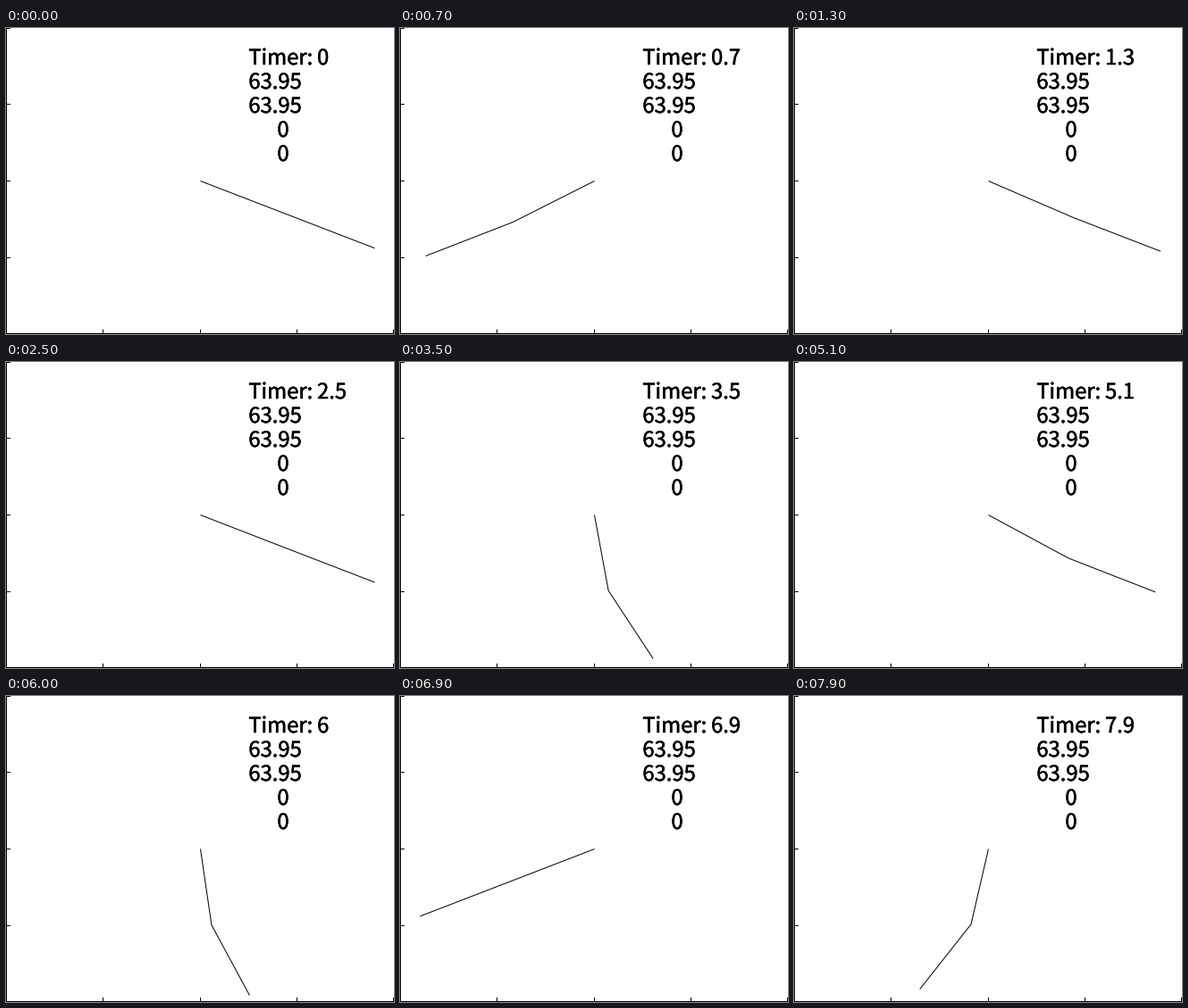
Animation, 434 px wide and 343 px high, one loop 8 s. Source, as a matplotlib script:

```python
import numpy as np
import matplotlib.pyplot as plt
from matplotlib.animation import FuncAnimation
from matplotlib.patheffects import withStroke

W, H, DPI = 434, 343, 64
PX = 72 / DPI                      # one pixel in points
FRAMES, STEP = 80, 100             # 8 s loop
PIVOT = (217.5, 171.5)

G, L, START = 9.8, 0.2, 63.95      # gravity, arm length, start angle in degrees
PERIOD = 1.2544                    # this start gives a closed symmetric swing
QUARTER = PERIOD / 4


def rates(s):
    """Equal-mass, equal-length double pendulum."""
    a, b, wa, wb = s
    c, d = np.cos(a - b), np.sin(a - b)
    pull = -G / L * np.sin(b) + wa**2 * d
    acc_a = (-2 * G / L * np.sin(a) - wb**2 * d - c * pull) / (2 - c * c)
    return np.array([wa, wb, acc_a, pull - acc_a * c])


def quarter_swing(n=600):
    h = QUARTER / n
    s = np.array([np.radians(START), np.radians(START), 0, 0])
    path = [s[:2]]
    for _ in range(n):
        k1 = rates(s)
        k2 = rates(s + h / 2 * k1)
        k3 = rates(s + h / 2 * k2)
        k4 = rates(s + h * k3)
        s = s + h / 6 * (k1 + 2 * k2 + 2 * k3 + k4)
        path.append(s[:2])
    return np.linspace(0, QUARTER, n + 1), np.array(path)


TIMES, PATH = quarter_swing()


def angles(t):
    """Extend the quarter swing by its time and mirror symmetry."""
    p = t % PERIOD
    p = min(p, PERIOD - p)
    sign = 1
    if p > QUARTER:
        p, sign = PERIOD / 2 - p, -1
    return sign * np.array([np.interp(p, TIMES, PATH[:, k]) for k in (0, 1)])


fig = plt.figure(figsize=(W / DPI, H / DPI), dpi=DPI, facecolor="#fefefe")
ax = fig.add_axes([0, 0, 1, 1])
ax.set_xlim(0, W)
ax.set_ylim(H, 0)
ax.axis("off")


def stroke(xs, ys):
    return ax.plot(xs, ys, color="black", lw=PX, snap=False,
                   solid_capstyle="butt")[0]


def label(x, y, text, ha="left"):
    # the thin outline gives the slightly heavier weight
    return ax.text(x, y, text, ha=ha, va="baseline", color="black",
                   family="Noto Sans CJK JP", size=23.8 * PX,
                   path_effects=[withStroke(linewidth=0.5 * PX,
                                            foreground="black")])


# frame edges and ticks, on pixel centres
stroke([0.5, 0.5], [0, H])
stroke([0, W], [H - 0.5, H - 0.5])
for x in (108.5, 217.5, 325.5, 433.5):
    stroke([x, x], [H - 5, H])
for y in (0.5, 85.5, 171.5, 257.5):
    stroke([0, 5], [y, y])

# readout
ROWS = [41 + 27 * k for k in range(5)]
label(271.3, ROWS[0], "Timer:")
timer = label(348, ROWS[0], "0")
for y in ROWS[1:3]:
    label(271.3, y, f"{START}")
for y in ROWS[3:]:
    label(310, y, "0", ha="center")

arms = stroke([], [])


def draw(i):
    t = i * STEP / 1000
    th = angles(t)
    xs = PIVOT[0] + W / 4 * np.cumsum([0, *np.sin(th)])
    ys = PIVOT[1] + H / 4 * np.cumsum([0, *np.cos(th)])
    arms.set_data(xs, ys)
    timer.set_text(f"{t:g}")
    return arms, timer


anim = FuncAnimation(fig, draw, frames=FRAMES, interval=STEP,
                     repeat=True, repeat_delay=0)
plt.show()
```
